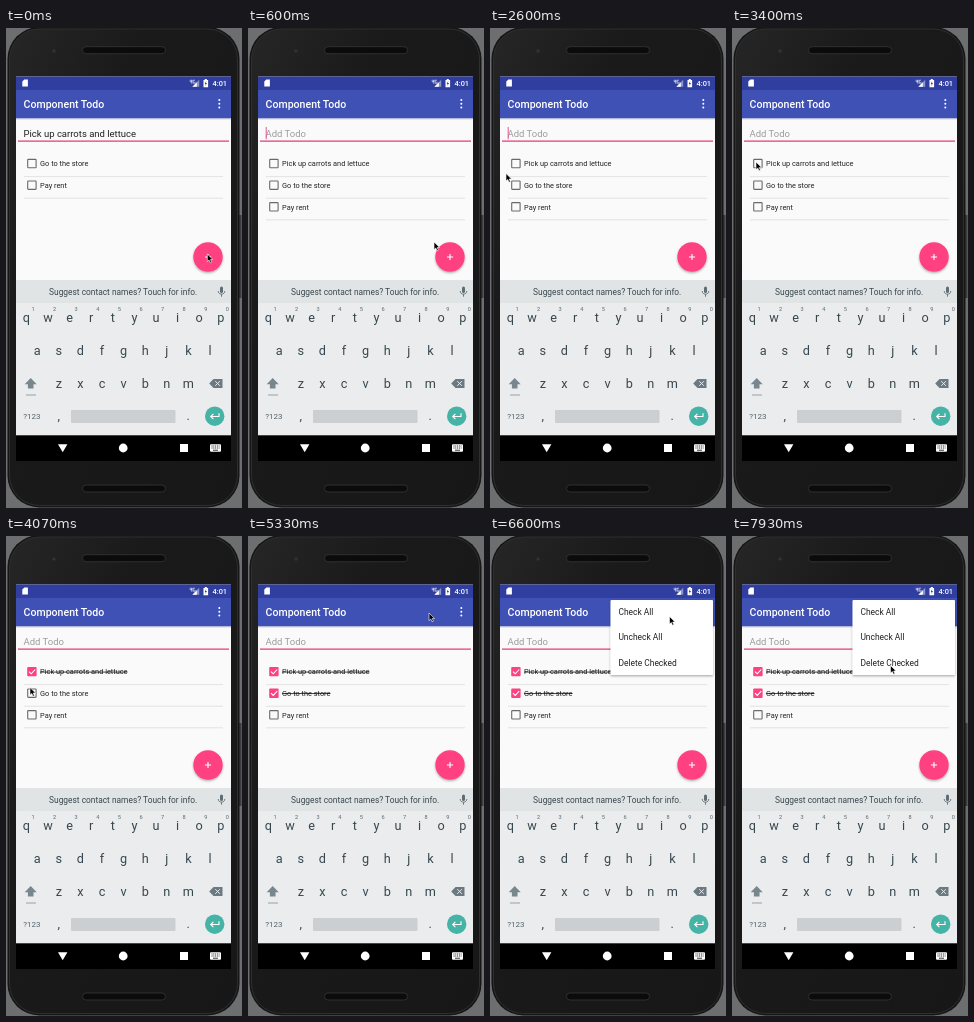
Animation, 236 px wide and 480 px high, one loop 8000 ms. Source, as an HTML page:

```html
<!DOCTYPE html>
<html lang="en">
<head>
<meta charset="utf-8">
<title>Component Todo</title>
<style>
html, body { margin: 0; width: 100%; height: 100%; overflow: hidden; background: #6c6e70; }
svg { display: block; width: 100%; height: 100%; font-family: Roboto, "Noto Sans", sans-serif; }
.title { font-size: 10.56px; font-weight: 500; fill: #fff; }
.clock { font-size: 7.4px; font-weight: 500; fill: #fff; }
.field { font-size: 9.5px; }
.item { font-size: 7.39px; fill: #222; }
.menu { font-size: 8.45px; fill: #212121; }
.suggest { font-size: 8.4px; fill: #37474f; }
.key { font-size: 12.7px; fill: #37474f; }
.hint { font-size: 5.6px; fill: #5a686f; }
.small { font-size: 8px; fill: #55646b; }
.mid { text-anchor: middle; }
</style>
</head>
<body>
<svg viewBox="0 0 236 480">
  <defs>
    <linearGradient id="body" x2="1" y2="1">
      <stop offset="0" stop-color="#262626"/>
      <stop offset=".3" stop-color="#1a1a1a"/>
      <stop offset="1" stop-color="#171717"/>
    </linearGradient>
    <filter id="shadow" x="-30%" y="-30%" width="160%" height="160%">
      <feDropShadow dx="0" dy="1.2" stdDeviation="1.2" flood-opacity=".32"/>
    </filter>
  </defs>

  <!-- phone -->
  <rect x="233" y="187" width="2.5" height="83" fill="#3c3d3f"/>
  <rect x="1.5" y="-1" width="232" height="480.5" rx="32" fill="#151515"/>
  <rect x="3.5" y="1" width="228" height="476.5" rx="30" fill="url(#body)" stroke="#2f2f30"/>
  <g fill="#0b0b0b" stroke="#363636" stroke-width=".8">
    <rect x="76.5" y="18.7" width="83" height="7" rx="3.5"/>
    <rect x="76.5" y="457" width="83" height="7" rx="3.5"/>
  </g>
  <circle cx="48" cy="23" r="1.8" fill="#303236"/>

  <!-- screen -->
  <rect x="10" y="48.5" width="215" height="384" fill="#fafafa"/>
  <rect x="10" y="62" width="215" height="28.3" fill="#3f51b5"/>
  <rect x="10" y="48.5" width="215" height="13.5" fill="#303f9f"/>
  <rect x="10" y="90.3" width="215" height="1.5" fill="#000" opacity=".1"/>
  <g fill="#fff">
    <path d="M18.3 51.6h3.6v7h-5.6v-5z"/>
    <path d="M193.2 51.8v7h-6.8z" opacity=".45"/>
    <path d="M190.8 54.3v4.5h-4.4z"/>
    <path d="M184.2 51.8v2h1.6v-2v4M189 52.2h-1.8v3h1.8v-1.4" fill="none" stroke="#fff" stroke-width=".6"/>
    <path d="M197.5 52h1.3v-1h2v1h1.3v7.3h-4.6z"/>
    <path d="M200.2 53l-1.5 3h1l-.3 2 1.6-3h-1z" fill="#303f9f"/>
    <circle cx="213.3" cy="72" r="1"/><circle cx="213.3" cy="75.8" r="1"/><circle cx="213.3" cy="79.6" r="1"/>
  </g>
  <text class="clock" x="206.5" y="57.7">4:01</text>
  <text class="title" x="17.6" y="79.7">Component Todo</text>

  <text class="field" id="field" x="17.5" y="108.5"></text>
  <path id="caret" d="M18.2 99v12.3" stroke="#e0457f" stroke-width=".9"/>
  <path d="M12 113.1h211" stroke="#e33a7c" stroke-width="1.2"/>
  <g id="list"></g>

  <g filter="url(#shadow)"><circle cx="202" cy="229" r="14.7" fill="#ff4081"/></g>
  <path d="M198.9 229h6.2M202 225.9v6.2" stroke="#fff" stroke-width="1.1"/>

  <!-- keyboard -->
  <rect x="10" y="252" width="215" height="156" fill="#eaecee"/>
  <rect x="10" y="252" width="215" height="23" fill="#e1e4e5"/>
  <text class="suggest mid" x="117.2" y="266.7">Suggest contact names? Touch for info.</text>
  <g fill="none" stroke="#5f6d74">
    <path d="M215.5 260v3.5" stroke-width="3" stroke-linecap="round"/>
    <path d="M212.2 263c0 4.2 6.6 4.2 6.6 0M215.5 266.3v2.4" stroke-width=".9"/>
  </g>
  <g id="keys"></g>
  <path d="M24.7 350l6 6.2h-3.2v4.3h-5.6v-4.3h-3.2z" fill="#78868d"/>
  <path d="M20 367h10" stroke="#a5afb4" stroke-width="1.2"/>
  <path d="M207.5 351h9v9h-9l-4.3-4.5z" fill="#6b7a82"/>
  <path d="M209.3 353.2l4.6 4.6m0-4.6l-4.6 4.6" stroke="#eaecee"/>
  <rect x="65" y="382" width="104.5" height="13" rx="1" fill="#cbcfd1"/>
  <circle cx="208.7" cy="388.2" r="9.7" fill="#45b3a6"/>
  <path d="M213 385.3v3.2h-8.3m2.7-2.7l-2.7 2.7 2.7 2.7" fill="none" stroke="#fff" stroke-width="1.1"/>

  <!-- navigation bar -->
  <rect x="10" y="407.3" width="215" height="25.7"/>
  <g fill="#fff">
    <path d="M52 416.3h9.4l-4.7 8z"/>
    <circle cx="117.2" cy="420" r="4.4"/>
    <rect x="174" y="416" width="8" height="8"/>
    <rect x="204" y="416.2" width="11" height="7.5" rx="1"/>
  </g>
  <path d="M205.5 418h8M205.5 420h8" stroke="#000" stroke-width=".9" stroke-dasharray="1 .8"/>
  <path d="M207 422.2h5" stroke="#000" stroke-width=".8"/>

  <g id="menu">
    <rect x="120.5" y="64" width="102.5" height="75" rx="1" fill="#fff" filter="url(#shadow)"/>
    <g id="menuText" class="menu">
      <text x="128.4" y="79">Check All</text>
      <text x="128.4" y="104.2">Uncheck All</text>
      <text x="128.4" y="129.5">Delete Checked</text>
    </g>
  </g>
  <path id="pointer" d="M0 0v7.6l1.8-1.6 1.2 2.8 1.4-.6-1.2-2.7h2.4z" stroke="#fff" stroke-width=".6"/>
</svg>

<script>
const LOOP = 8000;
const ADD = 430, CHECK_FIRST = 3420, CHECK_SECOND = 4270, OPEN_MENU = 5930;
const NEW_ITEM = "Pick up carrots and lettuce";

// pointer stops: time, x, y
const path = [
  [0, 201.3, 226], [480, 201.3, 226], [1000, 90, 138.5], [1800, 90, 138.5],
  [2350, 22, 143], [2600, 16, 145.5], [2850, 8, 143], [3250, 24, 134],
  [3650, 24, 134], [4000, 24, 151.5], [4450, 24, 151.5], [5330, 181, 77],
  [5700, 212, 75], [6130, 212, 75], [6600, 179.5, 80.5], [7000, 176, 84],
  [7700, 158.5, 129.5], [LOOP, 158.5, 129.5]
];

const $ = id => document.getElementById(id);
const clamp = v => Math.max(0, Math.min(1, v));
const ease = v => v * v * (3 - 2 * v);
const text = (cls, x, y, s) => `<text class="${cls}" x="${x}" y="${y}">${s}</text>`;

function keyRow(letters, x, y) {
  return [...letters].map((c, i) => text("key mid", x + i * 21.6, y, c)).join("");
}

$("keys").innerHTML =
  keyRow("qwertyuiop", 20.4, 294) + keyRow("asdfghjkl", 31.2, 327.3) + keyRow("zxcvbnm", 52.8, 360.3) +
  [..."1234567890"].map((c, i) => text("hint mid", 27 + i * 21.6, 283, c)).join("") +
  text("small mid", 25.9, 391.3, "?123") + text("key mid", 52.8, 391.5, ",") + text("key mid", 182.2, 391.5, ".");

function row(label, checked, i) {
  const y = 135.6 + i * 21.6;
  const box = checked
    ? `<rect x="21.2" y="${y - 4.7}" width="9.4" height="9.4" rx="1" fill="#ff4081"/>
       <path d="M23 ${y}l2.2 2.2 4-4.3" fill="none" stroke="#fff" stroke-width="1.1"/>`
    : `<rect x="21.7" y="${y - 4.2}" width="8.4" height="8.4" rx=".6" fill="none" stroke="#6a6a6a" stroke-width="1.1"/>`;
  const decoration = checked ? "line-through" : "none";
  return box +
    `<g text-decoration="${decoration}">${text("item", 34.1, y + 2.8, label)}</g>
     <path d="M18 ${y + 13}h199" stroke="#dedede" stroke-width=".8"/>`;
}

function pointerAt(t) {
  const i = path.findIndex(p => p[0] > t);
  const [t0, x0, y0] = path[i - 1], [t1, x1, y1] = path[i];
  const k = ease((t - t0) / (t1 - t0));
  return [x0 + (x1 - x0) * k, y0 + (y1 - y0) * k];
}

let listKey;
function draw(now) {
  const t = now % LOOP, added = t >= ADD;
  const items = [["Go to the store", t >= CHECK_SECOND], ["Pay rent", false]];
  if (added) items.unshift([NEW_ITEM, t >= CHECK_FIRST]);

  const key = String(items);
  if (key !== listKey) {
    listKey = key;
    $("list").innerHTML = items.map(([label, checked], i) => row(label, checked, i)).join("");
    $("field").textContent = added ? "Add Todo" : NEW_ITEM;
    $("field").setAttribute("fill", added ? "#9c9c9c" : "#222");
  }

  const caretOn = added && t < OPEN_MENU && (t - ADD) % 1000 < 500;
  $("caret").setAttribute("opacity", +caretOn);

  const open = ease(clamp((t - OPEN_MENU) / 200));
  $("menu").setAttribute("opacity", open);
  $("menu").setAttribute("transform", `translate(223 64) scale(${0.5 + open / 2}) translate(-223 -64)`);
  $("menuText").setAttribute("opacity", clamp(open * 2 - 1));

  $("pointer").setAttribute("transform", `translate(${pointerAt(t)})`);
}

const start = performance.now();
function tick() {
  draw(performance.now() - start);
  requestAnimationFrame(tick);
}
tick();
</script>
</body>
</html>
```
